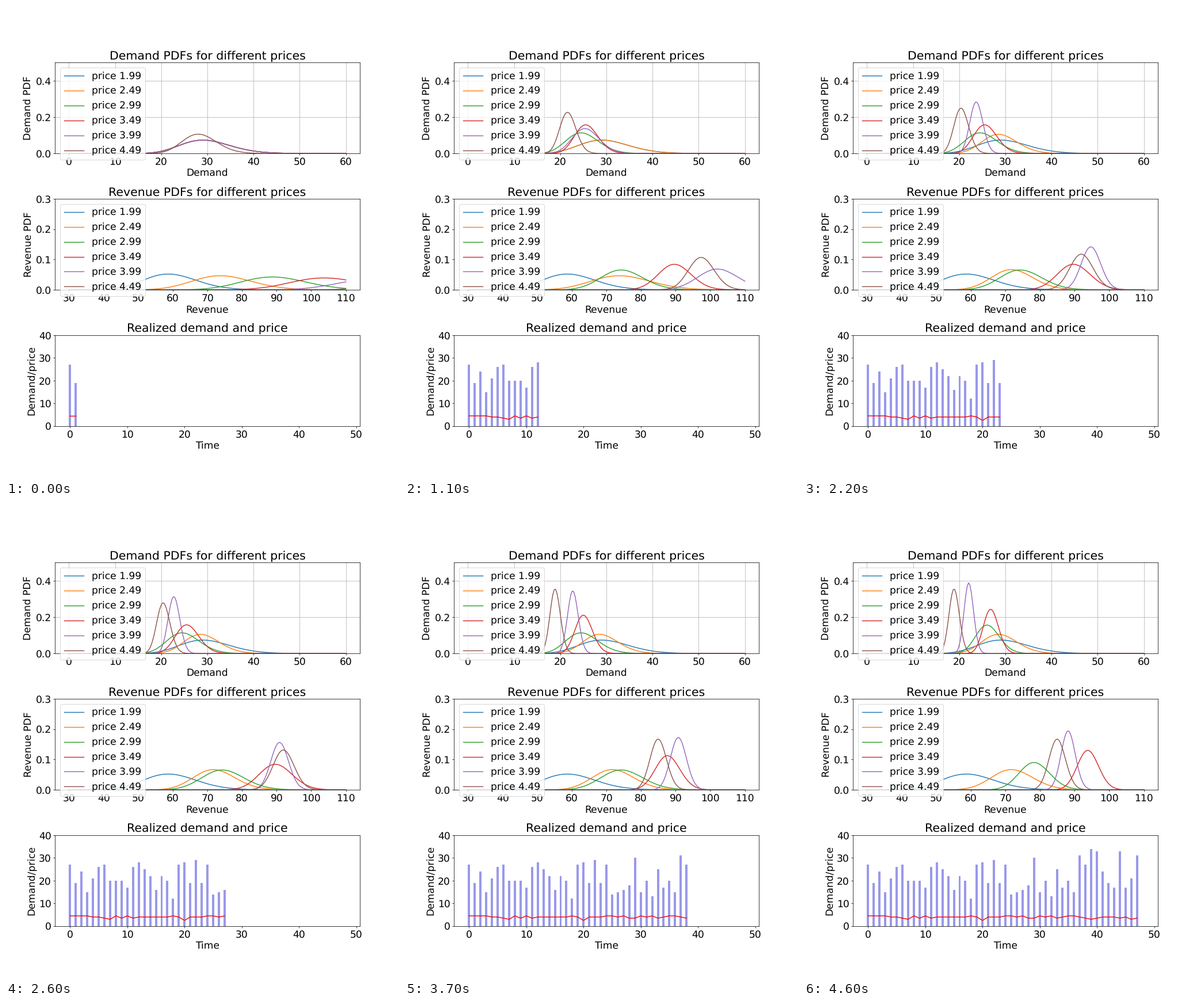
Recreate the animation shown at these times as a matplotlib script. Size 683x820 px, loop 4.7 s.

```python
import math

import matplotlib.pyplot as plt
import numpy as np
from matplotlib.animation import FuncAnimation

W, H, DPI = 683, 820, 64
SCALE = 68.3 / DPI
FRAMES, INTERVAL = 47, 100

plt.rcParams.update({
    "font.family": "DejaVu Sans",
    "font.size": 18 * SCALE,
    "text.hinting": "none",
})
for key in ("lines.linewidth", "axes.linewidth", "grid.linewidth",
            "patch.linewidth", "axes.titlepad", "axes.labelpad",
            "xtick.major.size", "xtick.major.pad", "xtick.major.width",
            "ytick.major.size", "ytick.major.pad", "ytick.major.width"):
    plt.rcParams[key] *= SCALE

PRICES = np.array([1.99, 2.49, 2.99, 3.49, 3.99, 4.49])

# Price chosen and units sold at each time step
choice = np.array(
    [5] * 4 + [4, 4, 3, 2, 5, 3, 5, 3] + [4] * 6 + [5, 4, 1, 4, 4, 4]
    + [5, 5, 4, 5, 3, 3, 5, 4, 5, 3, 4, 5, 5, 4, 3, 2, 3]
    + [4, 4, 4, 3, 4, 2, 3])
demand = np.array([
    27, 19, 24, 15, 21, 26, 27, 20, 20, 20, 17, 26,
    28, 25, 22, 16, 22, 20, 12, 27, 28, 19, 29, 19,
    27, 14, 15, 16, 18, 30, 15, 20, 13, 25, 17, 20,
    15, 31, 27, 34, 33, 24, 19, 17, 33, 17, 21, 31])
steps = np.arange(len(demand))

# Gamma prior of the demand at every price
ALPHA, BETA = 30, 1
demand_x = np.linspace(0, 60, 200)
revenue_x = np.linspace(30, 110, 200)


def gamma_pdf(x, a, b):
    x = np.maximum(x, 1e-9)
    return np.exp(a * math.log(b) + (a - 1) * np.log(x) - b * x - math.lgamma(a))


def posterior(k, n):
    """Gamma parameters of price k after n sales."""
    sold = demand[:n][choice[:n] == k]
    return ALPHA + sold.sum(), BETA + len(sold)


def label(ax, title, xlabel, ylabel):
    ax.set_title(title)
    ax.set_xlabel(xlabel)
    ax.set_ylabel(ylabel)


def price_lines(ax, x, top):
    lines = [ax.plot(x, 0 * x, label=f"price {p:.2f}")[0] for p in PRICES]
    margin = 0.05 * (x[-1] - x[0])
    ax.set_xlim(x[0] - margin, x[-1] + margin)
    ax.set_ylim(0, top)
    ax.legend(loc="upper left", labelspacing=0.553, borderpad=0.42)
    return lines


fig, (ax_d, ax_r, ax_t) = plt.subplots(3, 1, figsize=(W / DPI, H / DPI), dpi=DPI)
fig.subplots_adjust(left=0.125, right=0.9, bottom=0.11, top=0.88, hspace=0.5)

label(ax_d, "Demand PDFs for different prices", "Demand", "Demand PDF")
demand_lines = price_lines(ax_d, demand_x, 0.5)
ax_d.grid(True)

label(ax_r, "Revenue PDFs for different prices", "Revenue", "Revenue PDF")
revenue_lines = price_lines(ax_r, revenue_x, 0.3)

label(ax_t, "Realized demand and price", "Time", "Demand/price")
bars = ax_t.bar(steps, demand, width=0.4, color="mediumblue", alpha=0.4)
price_path, = ax_t.plot([], [], color="red")
ax_t.set_xlim(-2.62, 50.62)
ax_t.set_ylim(0, 40)
ax_t.set_yticks(range(0, 41, 10))


def update(i):
    for k, price in enumerate(PRICES):
        a, b = posterior(k, i + 1)
        demand_lines[k].set_ydata(gamma_pdf(demand_x, a, b))
        revenue_lines[k].set_ydata(gamma_pdf(revenue_x, a * price, b))
    shown = i + 2
    for t, bar in enumerate(bars):
        bar.set_visible(t < shown)
    price_path.set_data(steps[:shown], PRICES[choice[:shown]])
    return [*demand_lines, *revenue_lines, *bars, price_path]


anim = FuncAnimation(fig, update, frames=FRAMES, interval=INTERVAL,
                     repeat=True, repeat_delay=0, blit=False)
plt.show()
```
